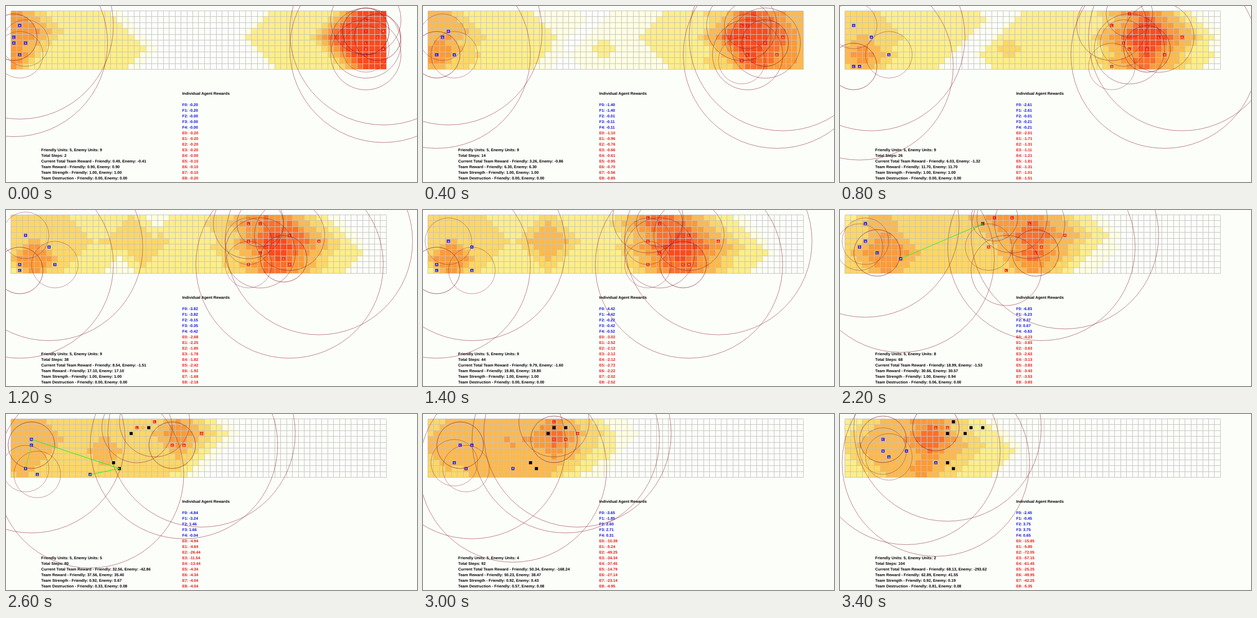
An HTML page that plays this animation: 800 by 343 pixels, repeating every 3.6 s.

```html
<!DOCTYPE html>
<html lang="en">
<head>
<meta charset="utf-8">
<title>Agent heat map</title>
<style>
html, body { margin: 0; width: 100%; height: 100%; overflow: hidden; background: #fcfefa; }
svg { display: block; width: 800px; height: 343px; }
text { font-family: "Liberation Sans", Arial, sans-serif; font-weight: bold; text-rendering: geometricPrecision; white-space: pre; }
</style>
</head>
<body>
<svg viewBox="0 0 800 343" xmlns="http://www.w3.org/2000/svg">
  <g id="heat" shape-rendering="crispEdges"></g>
  <path id="grid" fill="none" stroke="#c3c3bf" shape-rendering="crispEdges"/>
  <g id="units"></g>
  <g id="labels" font-size="7.58"></g>
  <g id="rings" fill="none" stroke="#861a28"></g>
  <g id="shots" stroke="#3ced28"></g>
</svg>
<script>
const FRAMES = 18, FRAME_MS = 200;
const COLS = 64, ROWS = 10, X0 = 9.5, Y0 = 9.5, CW = 11.42, CH = 11.4;
const keyTimes = [0, 4, 7, 9, 11, 13, 17];
const palette = ['', '#fffee2', '#ffee88', '#fed764', '#feb94c', '#fd9a36', '#fc702a', '#fb4b1e'];
const $ = id => document.getElementById(id);
const mix = (a, b, k) => a + (b - a) * k;
const cx = c => X0 + (c + .5) * CW;
const cy = r => Y0 + (r + .5) * CH;

// A cone is a stepped diamond: column, row, top level, top radius, width of each lower step.
function heatMap(cones) {
  const cells = [];
  for (let r = 0; r < ROWS; r++)
    for (let c = 0; c < COLS; c++)
      cells.push(Math.max(0, ...cones.map(([x, y, top, radius, step]) => {
        const d = Math.abs(c + .5 - x) + Math.abs(r - y);
        return top - Math.ceil(Math.max(0, d - radius) / step);
      })));
  return cells;
}
const maps = [];
maps.push(heatMap([[0,6,2,23,2], [1,3,5,4,2], [0,7,5,3,1], [63,4,2,23,1], [63,4,7,8,1]]));
maps.push(heatMap([[8,1,2,16,1], [2,4,3,8,1], [3,7,5,2,2], [43,7,2,20,1], [57,4,2,6,1],
  [28,6,3,2,1], [51.5,4,7,3,1.7], [50,0,6,1,2], [51,8,6,2,2]]));
maps.push(heatMap([[30,6,2,28,1], [49,4,1,9,1], [5,4,3,9,9], [4,7,5,3,1], [20.5,4,4,3.5,2],
  [43,5,7,3,2], [40,1,6,3,2], [43,8,6,3,2]]));
maps.push(heatMap([[24,6,3,23,3], [47,0,2,2,1], [0,3,3,8,2], [20,4,4,8,1], [7,5,5,2,2.5],
  [38.5,6,7,1.5,2], [34,1,7,1,2], [39,9,7,1,2]]));
maps.push(heatMap([[20,3,3,21,2.5], [0,8,3,6,2], [33,5,1,14,1], [7,6,5,4,2], [6,1,4,3,1],
  [32,3,6,2.5,2.5], [27,0,5,3,3], [32,6,6,1.5,2]]));
maps.push(heatMap([[16,3,3,17,2], [0,8,3,6,2], [32,2,1,7,1], [2,3,4,7,1], [16,5,4,3,1], [28.5,2,5,2.5,2]]));
maps.push(heatMap([[10,5,2,19,1], [11.5,4,4,9,3], [14.5,3,6,2.5,1.5], [14,0,5,3,2], [13,8,5,2,2]]));

// Columns of the hot core and its right front slide the heat between key poses.
const core = [58, 49, 42, 38, 32, 29, 15], front = [63.8, 63, 58, 52, 44, 36, 29];
const anchors = core.map((c, i) => [0, 8, c, front[i], COLS]);

function warp(x, from, to) {
  let i = 0;
  while (i < 3 && x > from[i + 1]) i++;
  return mix(to[i], to[i + 1], (x - from[i]) / (from[i + 1] - from[i]));
}
const clampCol = x => Math.max(0, Math.min(COLS - 1, Math.floor(x)));

function drawHeat(j, k) {
  const a = anchors[j], b = anchors[j + 1];
  const now = a.map((v, i) => mix(v, b[i], k));
  let out = '';
  for (let c = 0; c < COLS; c++) {
    const ca = clampCol(warp(c + .5, now, a)), cb = clampCol(warp(c + .5, now, b));
    for (let r = 0; r < ROWS; r++) {
      const level = Math.round(mix(maps[j][r * COLS + ca], maps[j + 1][r * COLS + cb], k));
      if (level) out += `<rect x="${X0 + c * CW}" y="${Y0 + r * CH}" width="${CW}" height="${CH}" fill="${palette[level]}"/>`;
    }
  }
  $('heat').innerHTML = out;
}

// Units: letter, path as column and row at each key time, then frame of loss, if any.
const friends = [
  ['A', [1,2, 4,4, 7,5, 6,5, 9,7, 13,9, 15,7]],
  ['A', [0,5, 2,9, 1,8, 2,8, 3,1, 3,3, 10,5]],
  ['C', [0,4, 1,9, 1,9, 4,6, 5,6, 3,4, 6,3]],
  ['S', [2,5, 1,2, 3,4, 5,4, 3,4, 2,8, 6,5]],
  ['S', [1,7, 7,7, 7,9, 9,6, 2,5, 4,9, 7,6]]];
const range = { A: 182.4, L: 68.4, C: 45.4, S: 45.4, I: 45.4 };
const at = (p, j, k, i) => {
  const get = n => p[Math.min(2 * n, p.length - 2) + i];
  return Math.round(mix(get(j), get(j + 1), k));
};
const enemies = [
  ['S', [60,3, 47,5, 37,4, 28,0, 23,1], 11, true],
  ['S', [60,6, 45,9, 37,8, 31,6, 24,5, 17,7], 13],
  ['I', [60,3, 48,0, 39,1, 33,0, 25,0, 20,2], 13],
  ['L', [60,7, 48,6, 39,6, 32,8, 27,9, 18,8], 13, true],
  ['L', [60,1, 45,2, 37,0, 30,0, 28,0, 21,1], 14],
  ['L', [60,5, 53,4, 44,3, 37,3, 31,1, 24,0, 18,0], 17],
  ['A', [63,6, 54,7, 44,8, 39,7, 33,5, 29,4, 17,2], 17],
  ['A', [63,3, 57,4, 49,4, 42,6, 37,3, 32,2, 17,1]],
  ['C', [62,4, 51,6, 43,8, 38,5, 32,6, 27,4, 15,1]]];
const markerCols = [29, 23, 22, 16];

function drawUnits(f, j, k) {
  let boxes = '', rings = '';
  const add = (color, [letter, path, lost = 99, hit]) => {
    const x = cx(at(path, j, k, 0)), y = cy(at(path, j, k, 1)), dead = f >= lost;
    boxes += `<rect x="${x - 3}" y="${y - 3}" width="6" height="6" fill="${dead ? '#000' : color}"/>`;
    if (!dead || hit && f === lost)
      boxes += `<text x="${x}" y="${y + 1.9}" font-size="5.2" text-anchor="middle" fill="${dead ? '#f80' : '#fff'}">${letter}</text>`;
    if (!dead)
      rings += `<circle cx="${x}" cy="${y}" r="${range[letter]}" stroke-width="${letter === 'C' ? 1 : .8}" opacity="${letter === 'S' ? .6 : .72}"/>`;
  };
  enemies.forEach(u => add('#ee1c10', u));
  friends.forEach(u => add('#1414e6', u));
  if (j > 2) {
    const x = cx(Math.round(mix(markerCols[j - 3], markerCols[j - 2], k)));
    rings += `<path d="M${x - 3} ${cy(1)}l3 -3 3 3 -3 3z" stroke="#f07000"/>`;
  }
  $('units').innerHTML = boxes;
  $('rings').innerHTML = rings;
}

const shots = {
  11: [[9,7, 23,1], [3,4, 5,6, .5]],
  13: [[3,3, 18,8], [13,9, 18,8], [3,4, 2,8, .8]]
};
const line = ([a, b, c, d, w = 1.2]) =>
  `<line x1="${cx(a)}" y1="${cy(b)}" x2="${cx(c)}" y2="${cy(d)}" stroke-width="${w}"/>`;

const rewards = [
  [-.2, -.2, -.001, -.001, -.001, -.2, -.2, -.2, -.2, -.001, -.1, -.1, -.1, -.2],
  [-2.61, -2.61, -.01, -.21, -.21, -2.01, -1.71, -1.31, -1.11, -1.21, -1.81, -1.31, -1.01, -1.51],
  [-4.42, -4.42, -.22, -.42, -.52, -3.02, -2.52, -2.12, -2.12, -2.12, -2.72, -2.22, -2.02, -2.52],
  [-5.63, -5.63, -.23, -.23, -.73, -3.53, -3.23, -2.13, -2.63, -2.73, -3.23, -2.73, -2.53, -3.23],
  [-6.83, -5.23, .37, .67, -.63, -4.23, -3.83, -3.63, -2.63, -3.13, -3.83, -3.43, -3.53, -3.83],
  [-4.84, -3.24, 1.46, 1.66, -.04, -4.94, -4.64, -26.44, -11.54, -13.44, -4.34, -4.34, -4.04, -4.54],
  [-2.45, -.45, 3.75, 3.75, .65, -15.85, -5.85, -72.05, -57.15, -61.45, -25.25, -49.95, -42.25, -5.35]];
const text = (x, y, s, fill = '#000') => `<text x="${x}" y="${y}" fill="${fill}">${s}</text>`;

// Friendly and enemy values; short lists cover the last key times only.
const teams = {
  'Current Total Team Reward': [[.49, 6.03, 9.79, 12.76, 18.99, 32.56, 68.13], [-.41, -1.32, -1.6, -.75, -1.53, -42.86, -293.62]],
  'Team Reward': [[.9, 11.7, 19.8, 25.2, 30.66, 37.56, 62.89], [.9, 11.7, 19.8, 25.2, 30.57, 35.4, 41.55]],
  'Team Strength': [[1, .92, .92], [1, .94, .67, .19]],
  'Team Destruction': [[0, .06, .33, .81], [0, .08, .08]]
};

function drawLabels(f, j, k) {
  const val = list => {
    const get = n => list[Math.max(0, n - keyTimes.length + list.length)];
    return mix(get(j), get(j + 1), k).toFixed(2);
  };
  const alive = enemies.filter(u => !(f >= u[2])).length;
  const rows = [`Friendly Units: ${friends.length}, Enemy Units: ${alive}`, `Total Steps: ${2 + 6 * f}`,
    ...Object.entries(teams).map(([name, [a, b]]) => `${name} - Friendly: ${val(a)}, Enemy: ${val(b)}`)];
  let out = text(343, 173.2, 'Individual Agent Rewards');
  for (let i = 0; i < 14; i++) {
    const friend = i < 5, name = friend ? 'F' + i : 'E' + (i - 5);
    out += text(343, 195.2 + i * 10.96, `${name}: ${val(rewards.map(r => r[i]))}`, friend ? '#1010e0' : '#e81616');
  }
  rows.forEach((s, i) => out += text(68.6, 283.2 + i * 10.94, s));
  $('labels').innerHTML = out;
}

let grid = '';
for (let c = 0; c <= COLS; c++) grid += `M${X0 + c * CW} ${Y0}V${Y0 + ROWS * CH}`;
for (let r = 0; r <= ROWS; r++) grid += `M${X0} ${Y0 + r * CH}H${X0 + COLS * CW}`;
$('grid').setAttribute('d', grid);

let shown = -1;
function tick() {
  const f = Math.floor(performance.now() / FRAME_MS) % FRAMES;
  if (f !== shown) {
    shown = f;
    let j = 0;
    while (j < keyTimes.length - 2 && f >= keyTimes[j + 1]) j++;
    const k = (f - keyTimes[j]) / (keyTimes[j + 1] - keyTimes[j]);
    drawHeat(j, k);
    drawUnits(f, j, k);
    drawLabels(f, j, k);
    $('shots').innerHTML = (shots[f] || []).map(line).join('');
  }
  requestAnimationFrame(tick);
}
tick();
</script>
</body>
</html>
```
